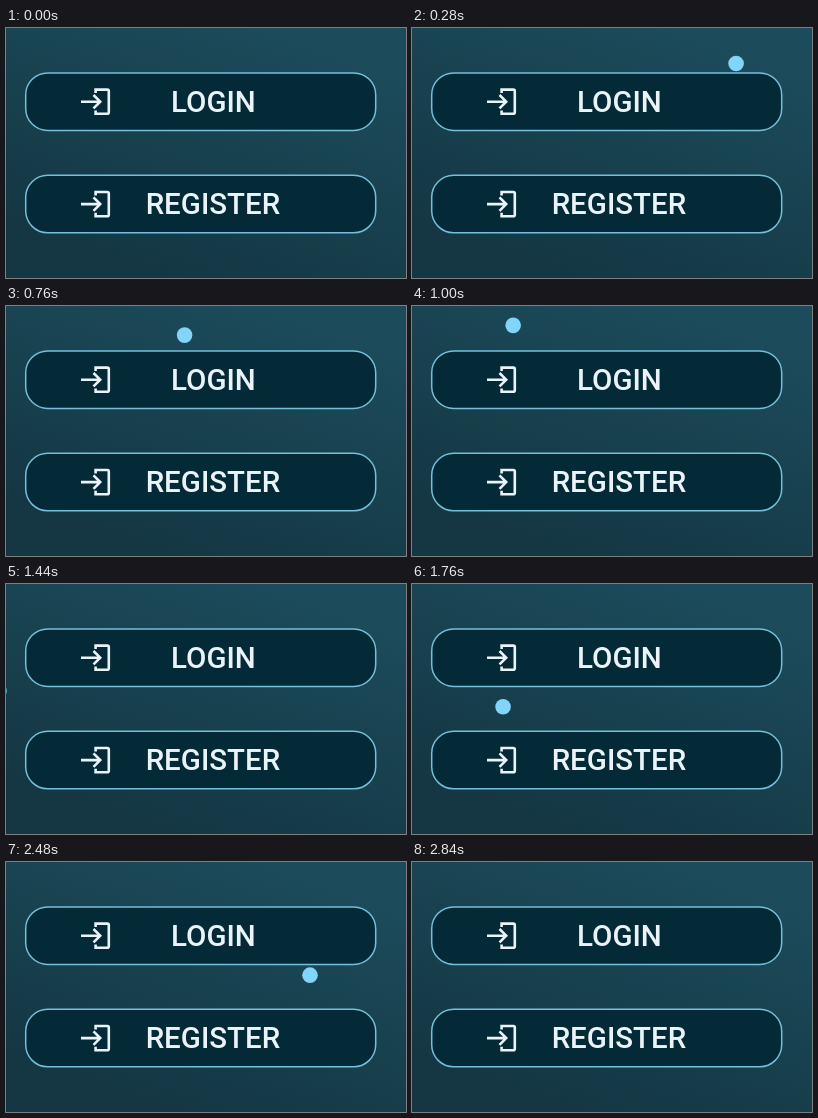
Recreate the animation shown at these times as an HTML page. Size 400x250 px, loop 2.88 s.

```html
<!DOCTYPE html>
<html lang="en">
<head>
<meta charset="utf-8">
<title>Login and register</title>
<style>
  html, body { margin: 0; width: 100%; height: 100%; overflow: hidden; }
  svg { display: block; width: 100vw; height: 100vh; }
  text { font: 500 29.5px Roboto, sans-serif; fill: #eaf3f7; }
  .button { fill: #042a37; stroke: #74bfdc; stroke-width: 1.5; }
  .icon { fill: none; stroke: #eaf3f7; stroke-width: 2.6; }
</style>
</head>
<body>
<svg viewBox="0 0 400 250">
  <defs>
    <linearGradient id="sky" gradientUnits="userSpaceOnUse" x1="255" y1="0" x2="165" y2="250">
      <stop offset="0" stop-color="#1c4b5b"/>
      <stop offset="1" stop-color="#143743"/>
    </linearGradient>
    <g id="frame">
      <rect class="button" x="19.7" y="44.9" width="350" height="57.5" rx="22"/>
      <path class="icon" d="M75 73.7H93.5M87.5 67l6.7 6.7l-6.7 6.7"/>
      <path class="icon" d="M89.6 65V61.6H101.3Q102.8 61.6 102.8 63.1V84.3Q102.8 85.8 101.3 85.8H89.6V82.4"/>
    </g>
  </defs>
  <rect width="400" height="250" fill="url(#sky)"/>
  <use href="#frame"/>
  <text x="165" y="84">LOGIN</text>
  <use href="#frame" y="102.4"/>
  <text x="139.7" y="186">REGISTER</text>
  <circle id="ball" r="7.8" fill="#81d4fa"/>
</svg>
<script>
  const LOOP = 2880, PERIOD = 68, EDGE = 409, TURN_IN = 89, TURN_OUT = 66;

  // Waves grow taller, and past x = 300 also longer, towards the right.
  function wave(x, middle, crest) {
    const unstretched = x - 0.27 * Math.max(0, x - 300);
    const height = 10 + 12 * (x / 400) ** 2;
    return middle + height * Math.cos(2 * Math.PI * (unstretched - crest) / PERIOD);
  }
  const upper = x => wave(x, 24, TURN_IN - PERIOD / 2);
  const lower = x => wave(x, 130, TURN_OUT);

  function wavePath(from, to, height) {
    const points = [];
    for (let i = 0; i <= 200; i++) {
      const x = from + (to - from) * i / 200;
      points.push(`${x} ${height(x)}`);
    }
    return 'M' + points.join('L');
  }

  function leg(start, end, d) {
    const path = document.createElementNS('http://www.w3.org/2000/svg', 'path');
    path.setAttribute('d', d);
    return { start, end, path, length: path.getTotalLength() };
  }

  // In along the top, round the left side, out between the buttons.
  const legs = [
    leg(0, 1035, wavePath(EDGE, TURN_IN, upper)),
    leg(1035, 1680, `M${TURN_IN} ${upper(TURN_IN)}C20 4 -77 146 ${TURN_OUT} ${lower(TURN_OUT)}`),
    leg(1680, 2840, wavePath(TURN_OUT, EDGE, lower))
  ];

  const ball = document.getElementById('ball');

  function draw(time) {
    const { start, end, path, length } = legs.find(l => time < l.end) || legs[2];
    const progress = Math.min((time - start) / (end - start), 1);
    const { x, y } = path.getPointAtLength(length * progress);
    ball.setAttribute('cx', x);
    ball.setAttribute('cy', y);
  }

  const origin = performance.now();
  function tick() {
    draw((performance.now() - origin) % LOOP);
    requestAnimationFrame(tick);
  }
  tick();
</script>
</body>
</html>
```
